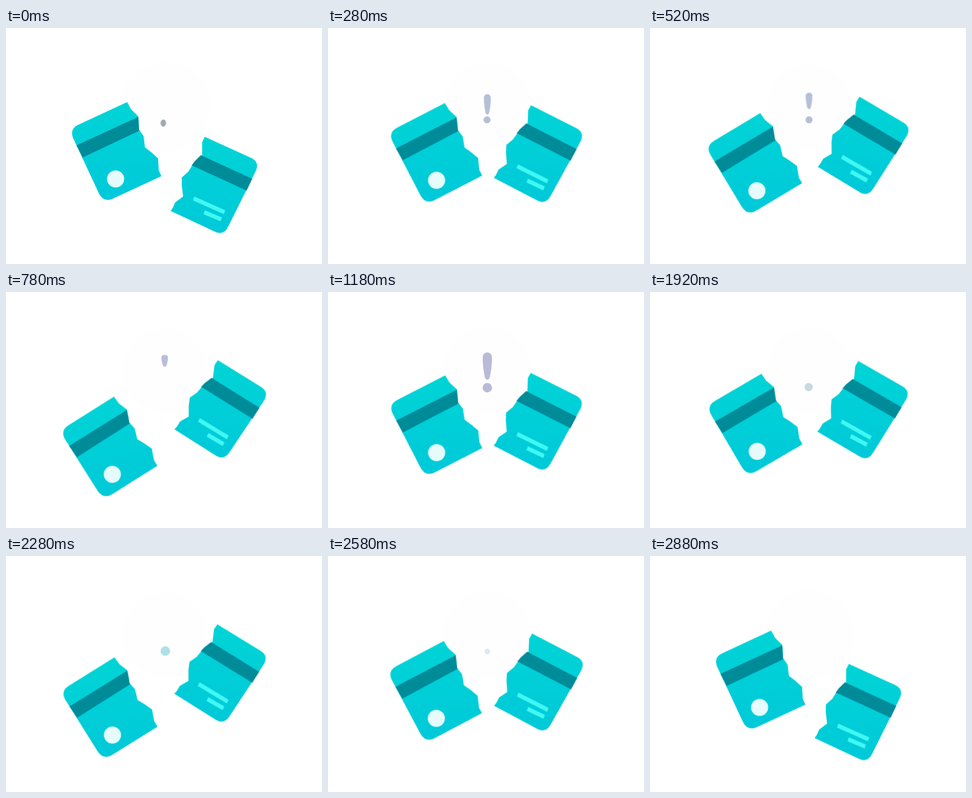
An HTML page for the animation above (2900 ms loop, 480 by 360 pixels).

```html
<!DOCTYPE html>
<html lang="en">
<head>
<meta charset="utf-8">
<title>Broken card</title>
<style>
  html, body { margin: 0; width: 100%; height: 100%; overflow: hidden; background: #fff; }
  svg { display: block; width: 480px; height: 360px; }

  .fall, .rise, .tilt, .halo { animation: 1450ms linear infinite; }
  .fall { animation-name: fall; }
  .rise { animation-name: rise; }
  .tilt { animation-name: tilt; animation-timing-function: cubic-bezier(.37, 0, .63, 1); }
  .fall .tilt { --turn: -7.4deg; transform-origin: 127px 267px; }
  .rise .tilt { --turn: 7.4deg; transform-origin: 359px 318px; }
  .halo {
    animation-name: halo;
    animation-timing-function: cubic-bezier(.37, 0, .63, 1);
    transform-origin: 242px 120px;
  }
  .bar { animation: bar 2900ms ease-in-out infinite; transform-origin: 242px 92px; }
  .dot { animation: dot 2900ms ease-in-out infinite; transform-origin: 242px 146px; }

  @keyframes fall {
    0% { transform: none; }
    5.17% { transform: none; animation-timing-function: cubic-bezier(.75, 0, .9, 1); }
    50%, 51% { transform: translateY(54px); animation-timing-function: cubic-bezier(.45, 0, .75, .75); }
    65% { transform: translateY(28px); animation-timing-function: cubic-bezier(.4, .2, .7, .8); }
    100% { transform: none; }
  }
  @keyframes rise {
    0% { transform: none; animation-timing-function: cubic-bezier(.3, 0, .5, 1); }
    29.7% { transform: translateY(-56px); }
    55.2% { transform: translateY(-56px); animation-timing-function: cubic-bezier(.75, 0, .9, 1); }
    100% { transform: none; }
  }
  @keyframes tilt {
    50% { transform: rotate(var(--turn)); }
  }
  @keyframes halo {
    50% { transform: scale(.94); }
  }
  @keyframes bar {
    0%, 2% { transform: translateY(16px) scale(.4); opacity: 0; }
    9.66% { transform: translateY(9px) scale(.74); opacity: 1; fill: #b3c0d6; }
    26.9% { transform: translate(-1px, 4px) scale(.71, .43); opacity: 1; fill: #b9bdda; }
    40.7% { transform: none; opacity: 1; fill: #b9bad5; }
    46% { transform: none; opacity: 1; }
    53%, 100% { transform: translateY(16px) scale(.4); opacity: 0; }
  }
  @keyframes dot {
    0% { transform: translate(-3px, -1px) scale(.58, .75); opacity: 1; fill: #a3a7b2; }
    9.66% { transform: translate(-.5px, -6px) scale(.74); opacity: 1; fill: #b3c0d6; }
    20% { transform: translate(-.5px, -6px) scale(.74); opacity: 1; }
    26%, 29% { transform: scale(.3); opacity: 0; }
    40.7% { transform: none; opacity: 1; fill: #b9bad5; }
    54.5% { transform: translate(-2px, -1px) scale(.75); opacity: .6; fill: #bfc1c8; }
    78.6% { transform: translateY(-1px); opacity: 1; fill: #aee0e8; }
    98%, 100% { transform: scale(.3); opacity: 0; }
  }
</style>
</head>
<body>
<svg viewBox="0 0 480 360">
  <defs>
    <linearGradient id="face" x1="0" y1="0" x2="0" y2="1">
      <stop offset="0" stop-color="#00d4d6"/>
      <stop offset="1" stop-color="#00c9d9"/>
    </linearGradient>
  </defs>

  <circle class="halo" cx="242" cy="120" r="68" fill="#fefefe"/>

  <path class="bar" fill="#b9bad5" d="M235 100C235 89.500 249 89.500 249 100C249 112 247.500 122 245.500 131Q242 137 238.500 131C236.500 122 235 112 235 100Z"/>
  <circle class="dot" cx="242" cy="146" r="7.200" fill="#b9bad5"/>

  <g class="fall"><g class="tilt">
    <path fill="url(#face)" d="M184 113L190 124L201 135L202 155L209 165L211 182L220 189L231 199L232 217L236 226L163 260Q148 267 141 252L102 168Q96 154 110 147.500Z"/>
    <path fill="#008b99" d="M107 179L201 135.500L202 155L203 156.500L116.500 197.500Z"/>
    <circle cx="166.500" cy="230.300" r="13" fill="#e6fbfb"/>
  </g></g>

  <g class="rise"><g class="tilt">
    <path fill="url(#face)" d="M302 166L298 174L298 194L287 203L277 219L267 228L267 240L269 257L257 266L253 275L250 279L318 311Q331 317 338 302L379 219Q386 204.500 372 198Z"/>
    <path fill="#008b99" d="M296 194L374 230L365.500 248L282 209.500L287 203Z"/>
    <path fill="#40f8f2" d="M286 257L333 278L331 284L284 263ZM302 278L328 289L326 295L300 284Z"/>
  </g></g>
</svg>
</body>
</html>
```
